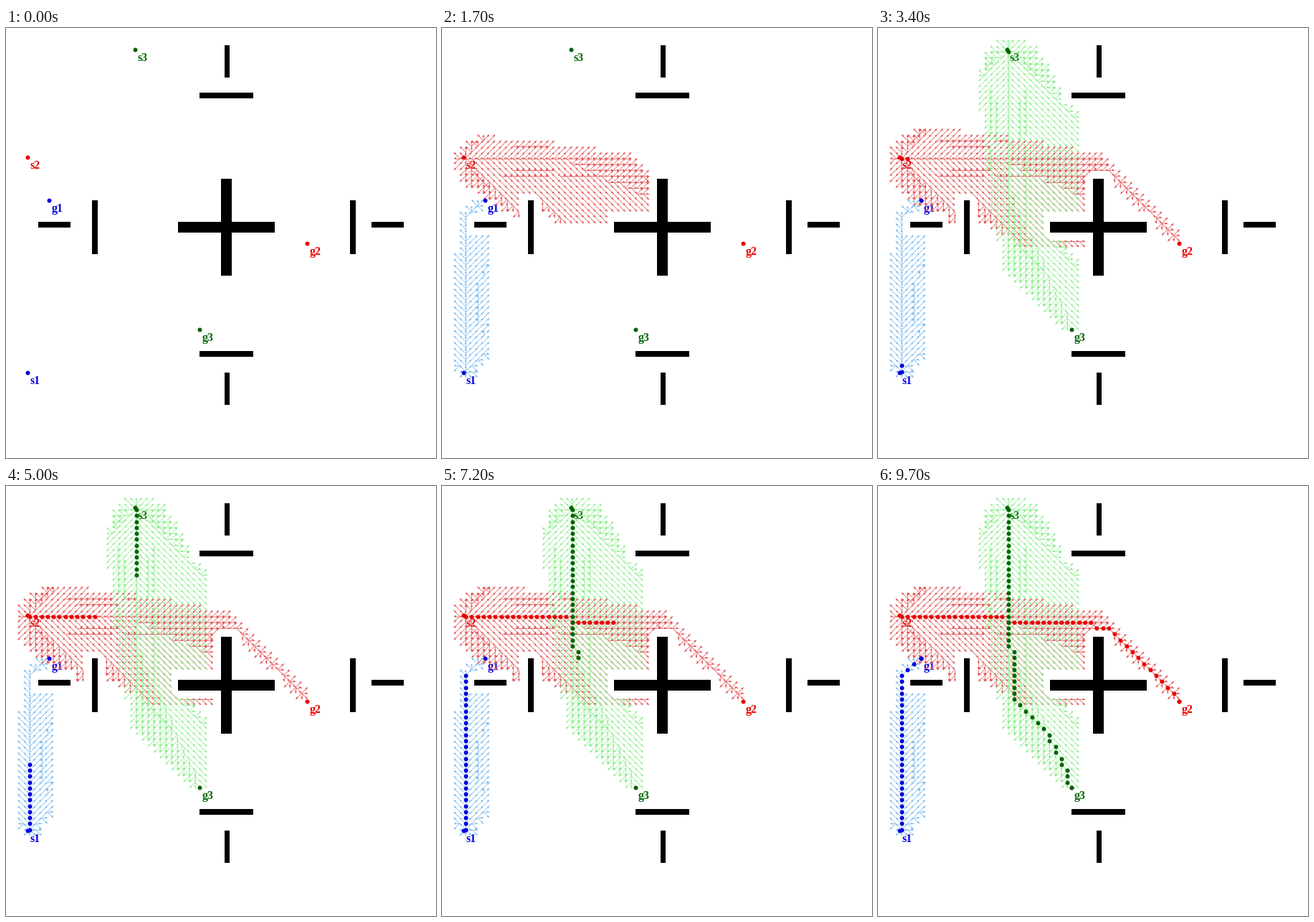
A matplotlib script that plays this animation: 600x599 px, repeating every 9900 ms.

```python
import math
import numpy as np
import matplotlib.pyplot as plt
from matplotlib.animation import FuncAnimation
from matplotlib.collections import LineCollection, PolyCollection
from matplotlib.patches import Rectangle

W, H, DPI = 600, 599, 100
PX = 72 / DPI            # points per pixel
CELL = 8.25              # grid spacing in pixels
CLEARANCE = 7.5
FRAMES, INTERVAL = 99, 100

# x, y, width, height
WALLS = [
    (300, 210, 15, 135), (240, 270, 135, 15),
    (304.5, 24, 7.5, 45), (270, 90, 75, 7.5),
    (270, 450, 75, 7.5), (304.5, 480, 7.5, 45),
    (45, 270, 45, 7.5), (120, 240, 7.5, 75),
    (480, 240, 7.5, 75), (510, 270, 45, 7.5),
]

# start, goal, dot colour, tree colour
ROBOTS = [
    ((30, 480), (60, 240), "#0000e0", "#7fbdf0"),
    ((30, 180), (420, 300), "#e80000", "#e4585a"),
    ((180, 30), (270, 420), "#006400", "#90ee90"),
]

MOVES = [(dx, dy) for dx in (-1, 0, 1) for dy in (-1, 0, 1) if dx or dy]


def to_cell(point):
    return tuple(round(v / CELL) for v in point)


def is_free(cell):
    x, y = cell[0] * CELL, cell[1] * CELL
    if not (0 <= x <= W and 0 <= y <= H):
        return False
    return not any(wx - CLEARANCE <= x <= wx + w + CLEARANCE
                   and wy - CLEARANCE <= y <= wy + h + CLEARANCE
                   for wx, wy, w, h in WALLS)


def a_star(start, goal):
    """Return the explored edges in order and the path of cells."""
    cost, parent = {start: 0.0}, {}
    closed, edges = set(), []
    queue, counter = {start: (0, 0)}, 0
    while queue:
        node = min(queue, key=queue.get)
        del queue[node]
        closed.add(node)
        if node == goal:
            break
        for dx, dy in MOVES:
            child = (node[0] + dx, node[1] + dy)
            if child in closed or not is_free(child):
                continue
            new_cost = cost[node] + math.hypot(dx, dy)
            if new_cost < cost.get(child, math.inf):
                cost[child], parent[child] = new_cost, node
                counter += 1
                total = round(new_cost + math.dist(child, goal), 9)
                queue[child] = (total, counter)
                edges.append((node, child))
    path = [goal]
    while path[-1] != start:
        path.append(parent[path[-1]])
    return edges, path[::-1]


edges, edge_colors, counts, paths = [], [], [], []
for start, goal, _, tree_color in ROBOTS:
    tree, path = a_star(to_cell(start), to_cell(goal))
    edges += tree
    edge_colors += [tree_color] * len(tree)
    counts.append(len(tree))
    paths.append([(x * CELL, y * CELL) for x, y in path[:-1]] + [goal])

shafts = np.array(edges, float) * CELL
direction = shafts[:, 1] - shafts[:, 0]
direction /= np.linalg.norm(direction, axis=1, keepdims=True)
normal = direction[:, ::-1] * [-1, 1]
tip = shafts[:, 1]
base = tip - 3.4 * direction
heads = np.stack([tip, base + 1.6 * normal, base - 1.6 * normal], axis=1)

# The robots take turns moving along their paths.
moves = [(i, path[step]) for step in range(max(map(len, paths)))
         for i, path in enumerate(paths) if step < len(path)]

blue, red, green = counts
TREE_FRAMES = [4, 9, 17, 21, 24, 28, 32]
TREE_EDGES = [0, blue, blue + 0.68 * red, blue + red, blue + red,
              blue + red + 0.45 * green, blue + red + green]

fig = plt.figure(figsize=(W / DPI, H / DPI), dpi=DPI, facecolor="white")
ax = fig.add_axes([0, 0, 1, 1])
ax.set(xlim=(0, W), ylim=(H, 0))
ax.axis("off")

for x, y, w, h in WALLS:
    ax.add_patch(Rectangle((x, y), w, h, color="black", lw=0, antialiased=False))

shaft_art = LineCollection([], colors=edge_colors, linewidths=0.75 * PX, zorder=3)
head_art = PolyCollection([], facecolors=edge_colors, linewidths=0, zorder=3)
ax.add_collection(shaft_art, autolim=False)
ax.add_collection(head_art, autolim=False)

trails = []
for number, (start, goal, color, _) in enumerate(ROBOTS, 1):
    dot = dict(ls="", marker="o", ms=6 * PX, mew=0, color=color, zorder=4)
    ax.plot(*zip(start, goal), **dot)
    trails.append(ax.plot([], [], **dot)[0])
    for letter, (x, y) in (("s", start), ("g", goal)):
        ax.text(x + 3.3, y + 16, f"{letter}{number}", color=color,
                family="Liberation Serif", weight="bold", size=16 * PX, zorder=2)


def update(frame):
    shown = int(np.interp(frame, TREE_FRAMES, TREE_EDGES))
    shaft_art.set_segments(list(shafts[:shown]))
    head_art.set_verts(list(heads[:shown]))
    moved = max(0, math.floor(5 + 1.95 * (frame - 34)))
    for i, trail in enumerate(trails):
        points = [p for robot, p in moves[:moved] if robot == i]
        trail.set_data([p[0] for p in points], [p[1] for p in points])
    return [shaft_art, head_art, *trails]


anim = FuncAnimation(fig, update, frames=FRAMES, interval=INTERVAL,
                     repeat=True, repeat_delay=0, blit=False)
plt.show()
```
